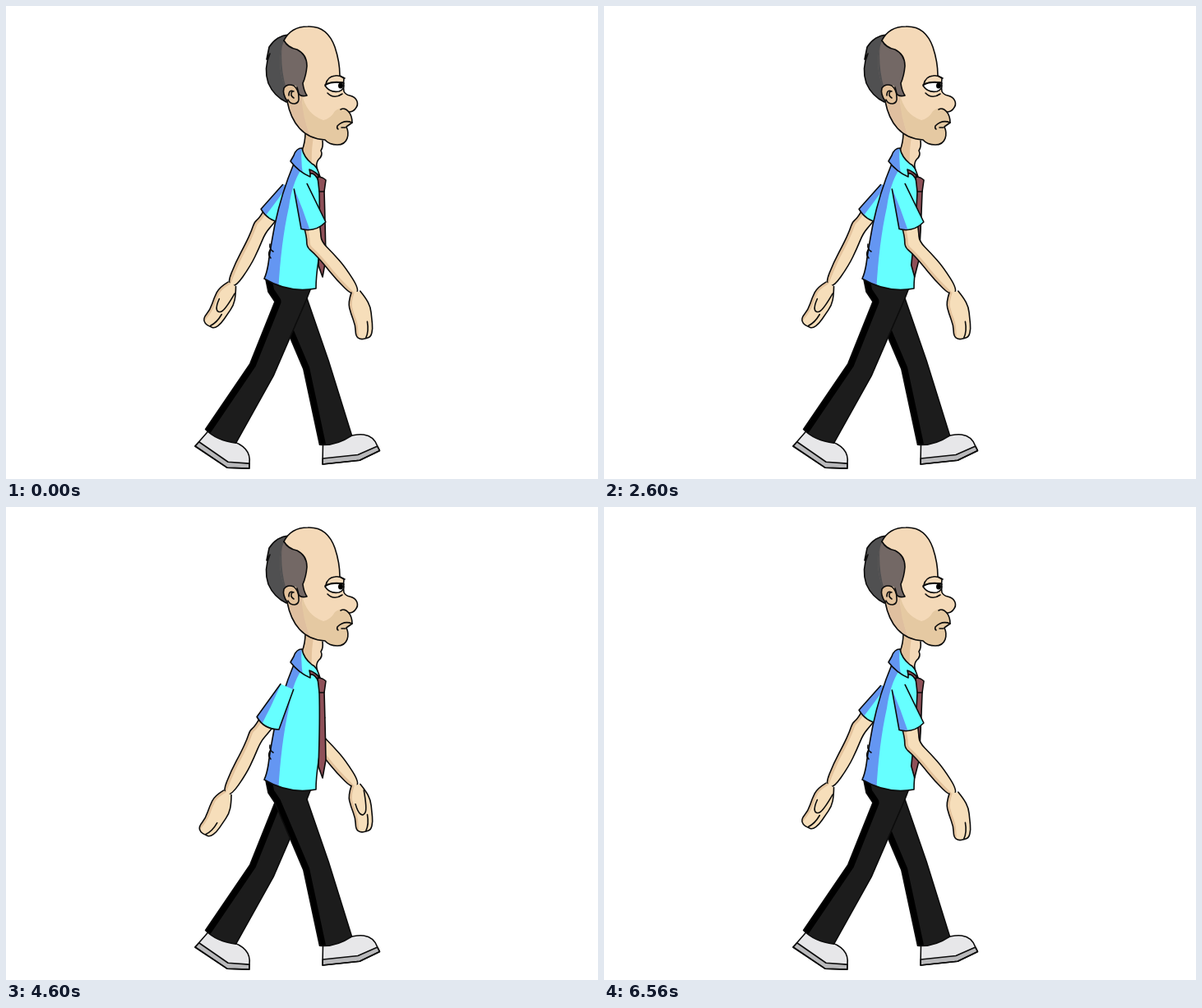
Recreate the animation shown at these times as an HTML page with a canvas. Size 720x576 px, loop 6.6 s.

```html
<!DOCTYPE html>
<html lang="en">
<head>
<meta charset="utf-8">
<title>Walk cycle</title>
<style>
  html, body { margin: 0; width: 100%; height: 100%; overflow: hidden; background: #fff; }
  canvas { display: block; width: 720px; height: 576px; }
</style>
</head>
<body>
<canvas id="stage" width="720" height="576"></canvas>
<script>
const ctx = document.getElementById('stage').getContext('2d');
const STEP = 40, FRAMES = 33, CYCLE = 32, HALF = 16;
const INK = '#0c0c0c', SKIN = '#f6deba', FACE = '#f4d9b8', SHADE = '#e3c29c', BLUSH = '#dfbf9f',
  STUBBLE = '#e5c9a2', CYAN = '#66ffff', BLUE = '#6496f2', TIE = '#8e5058', PANTS = '#1c1c1c',
  SHOE = '#e7e7e9', SOLE = '#b9b9bb', HAIR = '#736865', HAIR_BACK = '#505051';

// phase, heel x, heel y, heel angle, toe angle, knee x, knee y
const LEG = [
  [0, 385, 558, -6, -26, 377, 437],
  [4, 352, 556, 3, 2, 364, 435],
  [8, 322, 555, 5, 5, 347, 431],
  [13, 287, 553, 7, 7, 333, 428],
  [16, 230, 536, 34, 2, 311, 443],
  [20, 262, 525, 32, 20, 335, 440],
  [24, 304, 528, 20, 20, 364, 428],
  [29, 340, 538, 9, 9, 375, 433]
];
// phase, upper arm, forearm and hand angles
const ARM = [
  [0, -16, -39, -10],
  [13, 20, 5, 25],
  [16, 30, 28, 30],
  [29, -14, -26, -10]
];

// Values of a periodic key table at a given time.
function pose(keys, time) {
  const t = time % CYCLE;
  const i = keys.findLastIndex(k => k[0] <= t);
  const a = keys[i], b = keys[(i + 1) % keys.length];
  const s = (t - a[0]) / ((b[0] || CYCLE) - a[0]);
  return a.slice(1).map((v, j) => v + (b[j + 1] - v) * s);
}

// The body rides an arc over the standing leg, highest as the feet pass.
function lift(t) {
  const s = Math.abs(t % HALF - HALF / 2) / (HALF / 2);
  return 1.42 * (1 - s ** 2.5);
}

const rad = deg => deg * Math.PI / 180;

// Maps local coordinates of a rotated part to the stage.
function joint([ox, oy], deg) {
  const c = Math.cos(rad(deg)), s = Math.sin(rad(deg));
  return (x, y) => [ox + x * c - y * s, oy + x * s + y * c];
}

function lines(pts) {
  const p = new Path2D();
  pts.forEach((q, i) => i ? p.lineTo(...q) : p.moveTo(...q));
  return p;
}

function curve(pts) {
  const p = new Path2D(), last = pts.length - 1;
  p.moveTo(...pts[0]);
  for (let i = 1; i < last; i++) {
    const [x, y] = pts[i], [nx, ny] = pts[i + 1];
    if (i === last - 1) p.quadraticCurveTo(x, y, nx, ny);
    else p.quadraticCurveTo(x, y, (x + nx) / 2, (y + ny) / 2);
  }
  return p;
}

const path = d => typeof d === 'string' ? new Path2D(d) : d;
function fill(d, colour) { ctx.fillStyle = colour; ctx.fill(path(d)); }
function ink(d, width = 1.6, colour = INK) {
  ctx.lineWidth = width; ctx.strokeStyle = colour; ctx.stroke(path(d));
}
function part(d, colour) { fill(d, colour); ink(d); }
function inside(d, draw) { ctx.save(); ctx.clip(path(d)); draw(); ctx.restore(); }
function placed(x, y, deg, draw) {
  ctx.save(); ctx.translate(x, y); ctx.rotate(rad(deg)); draw(); ctx.restore();
}

function drawLeg(phase, rise, near) {
  const [x, y, heel, bend, kx, ky] = pose(LEG, phase);
  const foot = joint([x, y], heel);
  const ball = foot(43 + 0.12 * (heel - bend), 0), toe = joint(ball, bend);

  const shoe = lines([foot(0, 0), foot(3, -24), foot(30, -29)]);
  shoe.bezierCurveTo(...toe(12, -31), ...toe(29, -25), ...toe(27, -6));
  shoe.lineTo(...toe(27, 0));
  shoe.lineTo(...ball);
  shoe.closePath();
  fill(shoe, SHOE);
  const sole = lines([foot(0, 0), ball, toe(27, 0), toe(27, -6), toe(1, -7), foot(1, -7)]);
  sole.closePath();
  part(sole, SOLE);
  ink(shoe);

  const move = ([px, py]) => [px - 3 * rise, py - 8 * rise];
  const back = move([327, 360]), front = move([366, 356]);
  const hem = [foot(-1, -24), foot(39, -31)];
  const ax = (hem[0][0] + hem[1][0]) / 2 - (back[0] + front[0]) / 2;
  const ay = (hem[0][1] + hem[1][1]) / 2 - back[1];
  const len = Math.hypot(ax, ay), dx = 16 * ay / len, dy = -16 * ax / len;
  const rear = [back, [kx - dx, ky - dy], hem[0]];
  const fore = [[kx + dx, ky + dy], front];
  if (near) {
    rear.unshift(move([316, 333]), move([319, 348]));
    fore.push(move([371, 343]));
  }
  const trousers = lines(rear);
  trousers.quadraticCurveTo(...foot(18, -20), ...hem[1]);
  fore.forEach(p => trousers.lineTo(...p));
  if (near) trousers.closePath();
  fill(trousers, PANTS);
  inside(trousers, () => ink(lines(rear), 15, '#000'));
  ink(trousers);
}

function drawArm(phase, shoulder, near) {
  const [upper, lower, wrist] = pose(ARM, phase);
  const reach = near ? 93 : 86;
  const u = joint(shoulder, upper), f = joint(u(0, reach), lower), h = joint(f(0, 77), wrist);

  const rear = [u(-8, reach - 27), u(-8, reach - 11), f(-11, -4), f(-9, 7), f(-8, 24), f(-8, 50), f(-5, 78)];
  const arm = curve([...rear, f(6, 78), f(10, 45), f(9, 22), f(7, 2), u(10, reach - 13), u(12, reach - 27)]);
  fill(arm, SKIN);
  inside(arm, () => ink(curve(rear), 8, SHADE));
  ink(arm);

  const palm = [h(-5, -1), h(-11, 10), h(-10, 24), h(-7, 39), h(-9, 52), h(-4, 57), h(3, 57),
    h(9, 56), h(13, 47), h(14, 34), h(15, 20), h(11, 8), h(6, -1)];
  const hand = curve(palm);
  fill(hand, SKIN);
  inside(hand, () => ink(curve(palm.slice(0, 5)), 7, SHADE));
  ink(hand);
  ink(curve([h(3, 56), h(8, 49), h(8, 37)]));
  if (!near) ink(curve([h(9, 7), h(9, 30), h(3, 38), h(-3, 32), h(-4, 22)]));

  placed(...shoulder, upper, () => {
    const sleeve = near ? 'M-7 22L-12 71Q3 80 19 71L10 20' : 'M-4 26L-12 65Q2 73 17 67L10 20';
    fill(sleeve, CYAN);
    inside(sleeve, () => fill(near ? 'M-10 18L-14 80H-2Q-3 50-7 18Z' : 'M-20 0V85H-5L2 26V0Z', BLUE));
    ink(sleeve);
  });
}

function drawTie(swing) {
  part('M369 199Q376 201 382 209L380 213Q376 203 370 204Z', TIE);
  placed(384, 226, swing, () => {
    part('M-3-1L3-1Q4 30 5 82L1 104L-4 90Q-2 35-3-1Z', TIE);
  });
  part('M379 208Q385 208 389 212L387 226H381Z', TIE);
}

function drawTorso(swing) {
  const neck = 'M364 154Q364 166 360 176L366 190L379 200Q376 192 380 187Q386 182 383 176Q386 172 385 164';
  fill(neck, FACE);
  inside(neck, () => fill('M358 150L374 160Q371 175 372 200H355Z', SHADE));
  ink(neck);

  const shirt = 'M350 192Q335 228 327 266Q321 298 319 314Q317 326 314 332Q344 350 377 344' +
    'Q377 330 380 310Q387 268 385 240L381 207L366 196Z';
  fill(shirt, CYAN);
  inside(shirt, () => fill('M340 180L366 190Q349 208 344 245Q334 290 331 350H300V250Z', BLUE));
  ink(shirt);
  ink('M321 290Q320 296 325 299M321 297Q318 303 322 307');

  const collar = 'M360 173Q353 173 350 182L346 189Q356 202 370 208L370 200L378 204L382 208Q378 194 372 192Q362 184 360 173Z';
  fill(collar, CYAN);
  inside(collar, () => fill('M340 165H361Q357 185 362 210H340Z', BLUE));
  ink(collar);
  drawTie(swing);
}

function drawHead() {
  const hairBack = 'M344 35Q329 36 320 50L317 65L321 58Q313 76 319 94Q326 110 341 117L362 104L360 50Z';
  part(hairBack, HAIR_BACK);

  const face = 'M338 42C344 30 355 25 367 25C386 24 395 36 400 50Q406 68 406 85L411 88Q410 98 411 104' +
    'Q413 108 418 109C427 111 430 119 425 125Q422 129 417 129Q421 134 421 142L414 147' +
    'C418 156 416 169 403 169Q393 169 388 163Q369 162 357 149Q346 137 342 116L350 95Z';
  fill(face, FACE);
  inside(face, () => {
    fill('M335 98L360 98Q358 125 371 162L340 165Z', BLUSH);
    fill('M360 107Q365 132 386 139Q395 137 400 128Q407 122 413 126L430 131V175H386L371 161Q359 132 360 107Z', STUBBLE);
  });
  ink(face);

  const hair = 'M338 42Q343 51 354 53Q366 59 366 73Q365 85 361 94Q362 103 366 109Q359 111 356 107L354 99Q349 93 339 98Q328 70 338 42Z';
  fill(hair, HAIR);
  inside(hair, () => fill('M325 30H338Q331 68 341 101H325Z', HAIR_BACK));
  ink('M338 42Q343 51 354 53Q366 59 366 73Q365 85 361 94Q362 103 366 109Q359 111 356 107L354 99');

  part('M342 116Q336 107 338 100Q342 94 350 97Q356 102 356 111Q357 118 351 119Q345 119 343 114', SHADE);
  ink('M344 109Q344 101 350 104M348 104Q345 109 350 112');

  part('M388 97Q393 91 410 93Q413 101 405 104Q394 106 388 97Z', '#fff');
  ctx.beginPath();
  ctx.ellipse(407, 97, 3, 3.6, 0, 0, 7);
  ctx.fillStyle = '#000';
  ctx.fill();
  ink('M389 95Q391 86 400 85Q406 84 412 88M388 96Q398 91 411 94');
  ink('M391 106Q399 114 409 107');
  ink('M407 126Q412 123 417 129');
  ink('M421 142Q411 138 403 146Q402 149 404 150M408 148L413 148');
}

function draw(t) {
  const rise = lift(t);
  const lean = -3.4 * rise;
  const waist = [345 - 3 * rise, 340 - 9 * rise];
  const torso = joint(waist, lean);
  const swing = -1.6 * rise + 4 * Math.max(0, (t - 24) / 8);

  ctx.fillStyle = '#fff';
  ctx.fillRect(0, 0, 720, 576);
  drawArm(t + HALF, torso(8, -143), false);
  drawLeg(t, rise, false);
  drawLeg(t + HALF, rise, true);
  placed(...waist, lean, () => {
    ctx.translate(-345, -340);
    drawTorso(swing);
  });
  drawArm(t, torso(6, -140), true);
  placed(365 - 8 * rise, 95 - 8 * rise, 3.7 * rise, () => {
    ctx.translate(-365, -95);
    drawHead();
  });
}

ctx.lineJoin = ctx.lineCap = 'round';
const start = performance.now();
function tick() {
  const ms = Math.max(0, performance.now() - start);
  draw(Math.floor(ms / STEP) % FRAMES);
  requestAnimationFrame(tick);
}
tick();
</script>
</body>
</html>
```
